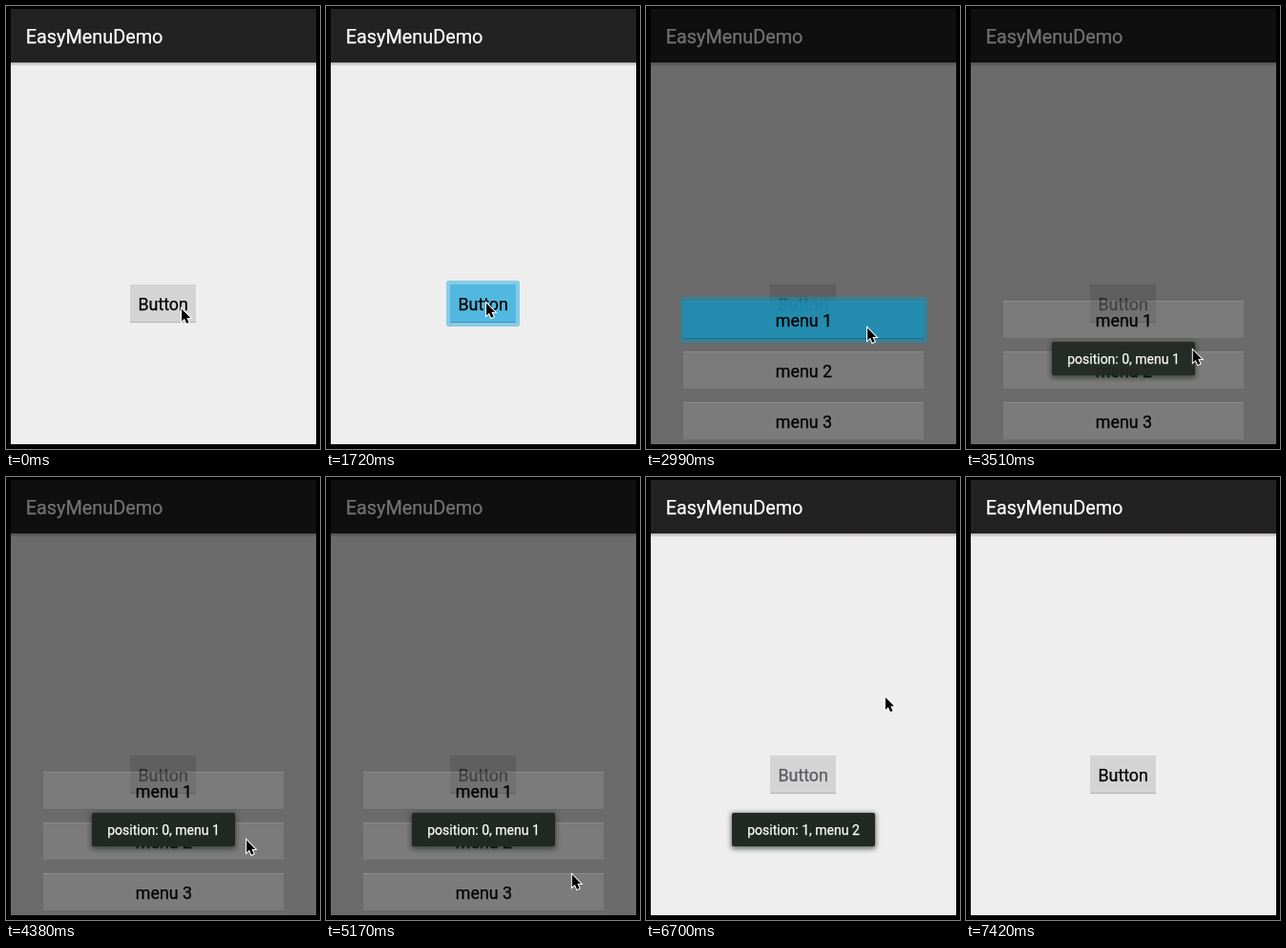
An HTML page that plays this animation: 329 by 463 pixels, repeating every 7.48 s.

```html
<!DOCTYPE html>
<html lang="en">
<head>
<meta charset="utf-8">
<title>Easy menu</title>
<style>
html, body { margin: 0; width: 100%; height: 100%; overflow: hidden; background: #000; }
svg { display: block; width: 329px; height: 463px; }
text {
  font-family: Roboto, "Open Sans", sans-serif; font-size: 17.8px; text-anchor: middle;
  stroke: currentColor; stroke-width: .25px; fill: currentColor;
}
.title { font-size: 19.85px; text-anchor: start; color: #fff; }
.message { font-size: 14px; color: #fff; }
</style>
</head>
<body>
<svg viewBox="0 0 329 463">
  <defs>
    <linearGradient id="shade" x2="0" y2="1">
      <stop offset="0" stop-color="#b5adb4"/>
      <stop offset="1" stop-color="#eee"/>
    </linearGradient>
    <filter id="blur" x="-10%" y="-30%" width="120%" height="160%"><feGaussianBlur stdDeviation="2.5"/></filter>
  </defs>
  <rect width="329" height="463"/>
  <rect x="5" y="3" width="320" height="455" fill="#eee"/>
  <rect x="5" y="3" width="320" height="56" fill="#222"/>
  <rect x="5" y="59" width="320" height="4" fill="url(#shade)"/>
  <text class="title" x="20.7" y="39">EasyMenuDemo</text>

  <rect x="130" y="291" width="69" height="40" fill="#d4d4d5"/>
  <rect x="130" y="330" width="69" height="1" fill="#b2b2b2"/>
  <g id="pressed">
    <rect x="126" y="287" width="77" height="48" rx="2.5" fill="#88cbe7"/>
    <rect x="130" y="291" width="69" height="40" fill="#51b8df"/>
    <rect x="130" y="330" width="69" height="1" fill="#3f95b7"/>
  </g>
  <text id="label" x="164.7" y="318">Button</text>

  <rect id="dim" x="5" y="3" width="320" height="455"/>
  <g id="menu"></g>

  <g id="toast">
    <rect x="89" y="351" width="152" height="38" rx="3" fill="#15251f" opacity=".6" filter="url(#blur)"/>
    <rect x="90" y="351" width="150" height="35" rx="2" fill="#222823"/>
    <text id="message" class="message" x="165" y="374"></text>
  </g>
  <path id="cursor" d="M1 .5v13l3 -2.7l2.2 5l2.4 -1.1l-2.2 -4.8h3.8z" stroke="#fff" stroke-width="2" paint-order="stroke"/>
</svg>
<script>
const LOOP = 7480;
const TICK = LOOP / 59;
const PHASE = 67;
const $ = id => document.getElementById(id);

// Pointer moves: start, end, x, y
const home = [183, 316];
const moves = [
  [250, 860, 168, 315],
  [1280, 1410, 167, 310],
  [1800, 1960, 167, 325],
  [1980, 2850, 231, 336],
  [3270, 3890, 251, 416],
  [3890, 4260, 251, 379],
  [4930, 5330, 262, 447],
  [5330, 6200, 249, 226],
  [6600, 7270, 288, 393]
];

const ramp = (t, a, b) => Math.min(1, Math.max(0, (t - a) / (b - a)));
const smooth = p => p * p * (3 - 2 * p);
const easeOut = p => 1 - (1 - p) ** 2;
const between = (t, a, b) => t >= a && t < b;
const show = (el, amount) => el.setAttribute("opacity", Number(amount));
const snap = t => Math.max(0, Math.floor((t - PHASE) / TICK) * TICK + PHASE);

function pointer(t) {
  return moves.reduce(([x, y], [a, b, toX, toY]) => {
    const p = smooth(ramp(t, a, b));
    return [x + (toX - x) * p, y + (toY - y) * p];
  }, home);
}

$("menu").innerHTML = [0, 1, 2].map(i => {
  const y = 308 + 53 * i;
  return `<rect x="39" y="${y}" width="252" height="40" fill="#fff" opacity=".11"/>
  <rect x="39" y="${y}" width="252" height="1" fill="#fff" opacity=".12"/>
  <rect x="39" y="${y + 39}" width="252" height="1" opacity=".16"/>
  <g class="glow" fill="#1490bb">
    <rect x="36" y="${y - 4}" width="259" height="48" rx="2" opacity=".55"/>
    <rect x="39" y="${y}" width="252" height="40" opacity=".64"/>
    <rect x="39" y="${y + 39}" width="252" height="1" fill="#0d516b" opacity=".5"/>
  </g>
  <text x="165.4" y="${y + 27}">menu ${i + 1}</text>`;
}).join("");
const glows = document.querySelectorAll(".glow");

function draw(t) {
  const [x, y] = pointer(t);
  const leave = 1 - ramp(t, 6420, 6660);
  const dim = easeOut(ramp(t, 1750, 2080)) * leave;
  const item = t < 5450 ? 0 : 1;

  $("cursor").setAttribute("transform", `translate(${x} ${y})`);
  show($("cursor"), t < 7400);
  show($("pressed"), between(t, 1700, 1830));
  show($("dim"), .55 * dim);
  $("label").style.color = dim ? "#5a5a5e" : "#000";
  show($("menu"), easeOut(ramp(t, 1750, 2000)) * leave);
  show(glows[0], between(t, 2970, 3230));
  show(glows[1], between(t, 4490, 4620));
  show(glows[2], false);
  show($("toast"), ramp(t, 3270, 3500) * (1 - ramp(t, 7010, 7400)));
  $("message").textContent = `position: ${item}, menu ${item + 1}`;
}

const start = performance.now();
function tick() {
  draw(snap((performance.now() - start) % LOOP));
  requestAnimationFrame(tick);
}
tick();
</script>
</body>
</html>
```
